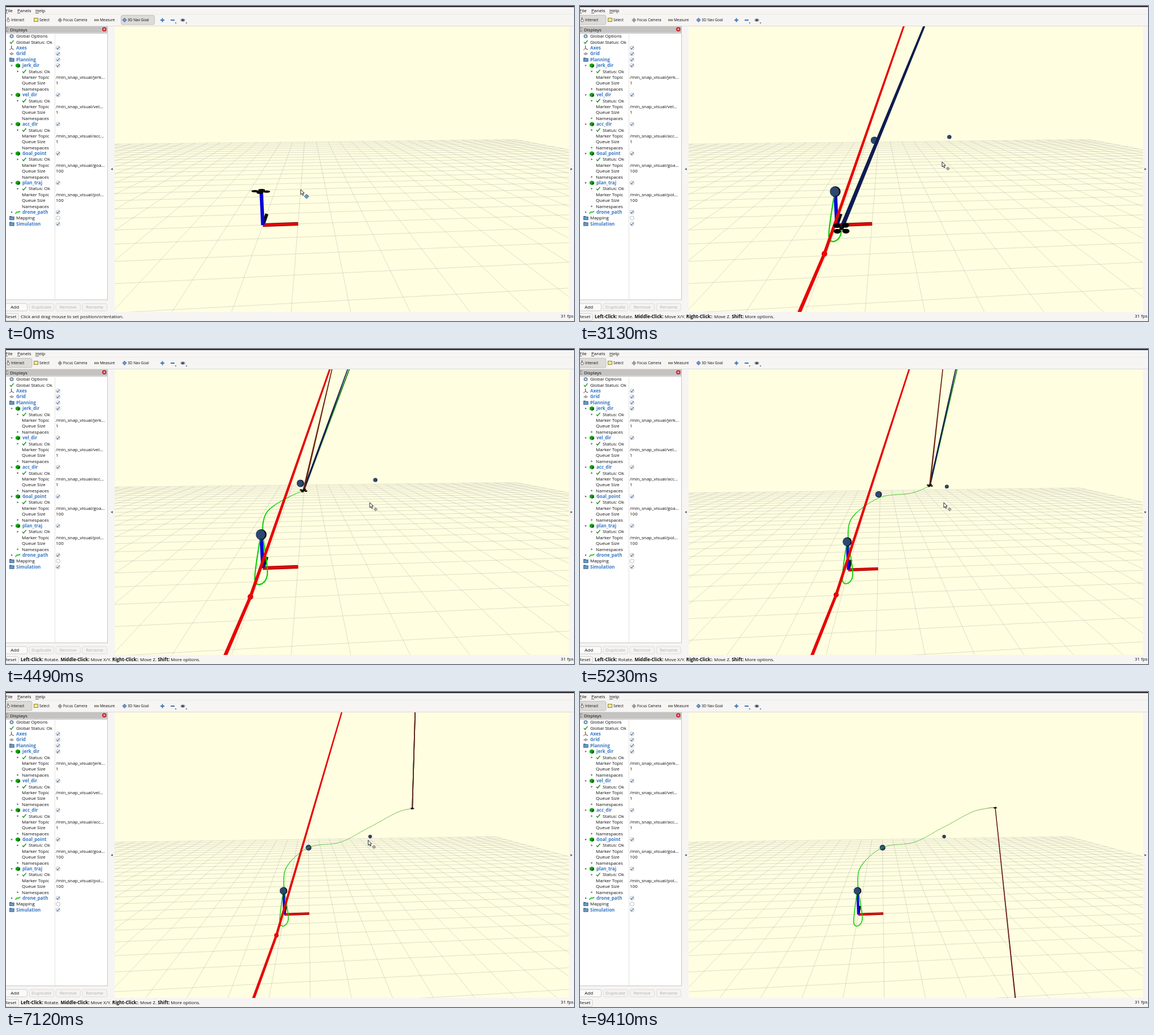
An HTML page with a canvas that plays this animation: 1004 px wide and 558 px high, repeating every 9510 ms.

```html
<!DOCTYPE html>
<html lang="en">
<head>
<meta charset="utf-8">
<title>Drone trajectory planning</title>
<style>
html, body { margin: 0; width: 100%; height: 100%; overflow: hidden; background: #f6f5f4; }
canvas { display: block; }
</style>
</head>
<body>
<canvas id="stage" width="1004" height="558"></canvas>
<script>
const c = document.getElementById('stage').getContext('2d');
const LOOP = 9510, FONT = '"Open Sans", "Noto Sans", sans-serif';
const VIEW = { x: 192, y: 36, w: 803, h: 506, cx: 593.5, cy: 289, f: 612 };
const BLUE = '#3a78c2', INK = '#0c0c0c', RED = '#e60606';
const EVENT = { goal2: 500, tool: 1060, goal3: 1410, plan: 1600, move: 2290, flip: 2700,
                jerk: 3350, pull: 4950, turn: 7300, planEnd: 7500, leave: 8880 };

// ---------- helpers ----------
const clamp = v => Math.max(0, Math.min(1, v));
const ease = v => { v = clamp(v); return v * v * (3 - 2 * v); };
const mix = (a, b, k) => a + (b - a) * k;

function rect(x, y, w, h, fill, line) {
  if (fill) { c.fillStyle = fill; c.fillRect(x, y, w, h); }
  if (line) { c.strokeStyle = line; c.lineWidth = 1; c.strokeRect(x + .5, y + .5, w - 1, h - 1); }
}
function box(x, y, w, h, fill, line) {
  c.beginPath();
  c.roundRect(x, y, w, h, 2.5);
  c.fillStyle = fill; c.fill();
  c.strokeStyle = line; c.lineWidth = .8; c.stroke();
}
function shape(pts, fill) {
  c.beginPath();
  pts.forEach(([x, y]) => c.lineTo(x, y));
  c.closePath();
  c.fillStyle = fill; c.fill();
}
function poly(pts, color, width) {
  c.beginPath();
  pts.forEach(([x, y]) => c.lineTo(x, y));
  c.strokeStyle = color; c.lineWidth = width; c.stroke();
}
function disc(x, y, rx, ry, fill) {
  c.beginPath();
  c.ellipse(x, y, rx, ry, 0, 0, 7);
  c.fillStyle = fill; c.fill();
}
function text(s, x, y, { color = INK, size = 8, bold = false } = {}) {
  c.font = `${bold ? 'bold ' : ''}${size}px ${FONT}`;
  c.fillStyle = color;
  c.fillText(s, x, y);
  return x + c.measureText(s).width;
}
function taper([x0, y0], w0, [x1, y1], w1, fill) {
  const len = Math.hypot(x1 - x0, y1 - y0) || 1;
  const nx = (y0 - y1) / len / 2, ny = (x1 - x0) / len / 2;
  shape([[x0 + nx * w0, y0 + ny * w0], [x1 + nx * w1, y1 + ny * w1],
         [x1 - nx * w1, y1 - ny * w1], [x0 - nx * w0, y0 - ny * w0]], fill);
}

// ---------- camera ----------
const PITCH = 11.3 * Math.PI / 180, YAW = 5.5 * Math.PI / 180;
const sp = Math.sin(PITCH), cp = Math.cos(PITCH), sw = Math.sin(YAW), cw = Math.cos(YAW);
const SHIFT = [-.056, .791, 4.05];
let pull = 0;

const toEye = ([x, y, z]) => [
  -2.257 + x * cw - y * sw,
  1.602 - (x * sw + y * cw) * sp - z * cp,
  9.9 + (x * sw + y * cw) * cp - z * sp];
const moved = p => p.map((v, i) => v + SHIFT[i] * pull);
const flat = ([x, y, z]) => [VIEW.cx + x / z * VIEW.f, VIEW.cy + y / z * VIEW.f];
const project = p => flat(moved(toEye(p)));

function groundLine(a, b) {
  let p = moved(toEye(a)), q = moved(toEye(b));
  if (p[2] > q[2]) [p, q] = [q, p];
  const near = .4;
  if (q[2] < near) return;
  if (p[2] < near) {
    const k = (near - p[2]) / (q[2] - p[2]);
    p = p.map((v, i) => mix(v, q[i], k));
  }
  c.moveTo(...flat(p));
  c.lineTo(...flat(q));
}
function grid() {
  c.beginPath();
  for (let i = -20; i <= 20; i++) {
    groundLine([i, -20, 0], [i, 20, 0]);
    groundLine([-20, i, 0], [20, i, 0]);
  }
  c.strokeStyle = 'rgba(150,150,155,.48)';
  c.lineWidth = .65;
  c.stroke();
}
function axes() {
  const o = project([0, 0, 0]), w = 62 / moved(toEye([0, 0, 0]))[2];
  const x = project([1, 0, 0]), y = project([0, 1, 0]), z = project([0, 0, 1]);
  taper(o, w, y, w * .92, '#08120a');
  taper(o, w, x, w, '#7c0404');
  taper(o, w * .72, x, w * .72, '#e60606');
  taper(o, w, z, w, '#0606d8');
}

// ---------- flight ----------
// time, screen x, screen y in the pulled-back view, depth in the close view
const KEYS = [
  [2250, 490, 352, 9.7], [2700, 484, 410, 9.3], [3080, 499, 403, 9.4], [3550, 491, 338, 10.3],
  [4000, 499, 305, 14.5], [4490, 535, 277, 22], [4950, 590, 269, 24], [5500, 640, 238, 27],
  [6200, 690, 214, 33], [7200, 720, 206, 39], [9410, 734, 205, 42]];

function spline(t) {
  const last = KEYS.length - 1;
  let i = 0;
  while (i < last - 1 && t >= KEYS[i + 1][0]) i++;
  const [a, b, d, e] = [i - 1, i, i + 1, i + 2].map(n => KEYS[Math.max(0, Math.min(last, n))]);
  const k = clamp((t - b[0]) / (d[0] - b[0]));
  return [1, 2, 3].map(n => b[n] + k / 2 * (d[n] - a[n] +
    k * (2 * a[n] - 5 * b[n] + 4 * d[n] - e[n] + k * (3 * (b[n] - d[n]) + e[n] - a[n]))));
}
function flight(t) {
  const [x, y, z] = spline(t), far = z + SHIFT[2], s = t - 5200;
  const sway = 4 * Math.sin(s / 1000 * Math.PI) * Math.exp(-((s / 900) ** 2));
  return [(x - VIEW.cx) / VIEW.f * far - SHIFT[0], (y + sway - VIEW.cy) / VIEW.f * far - SHIFT[1], z];
}
function trail(t) {
  const start = KEYS[0][0], step = 60;
  for (let s = start; s < t; s += step) {
    const a = moved(flight(s)), b = moved(flight(Math.min(t, s + step)));
    const far = clamp((b[2] - 16) / 28);
    poly([flat(a), flat(b)],
      `rgb(${mix(18, 130, far)},${mix(208, 165, far)},${mix(10, 85, far)})`,
      Math.max(.75, 21 / b[2]));
  }
}
function goal(p) {
  const e = moved(p), [x, y] = flat(e), r = 90 / e[2];
  disc(x + r * .1, y, r * 1.02, r * 1.02, '#10161f');
  disc(x - r * .05, y, r * .88, r * .9, '#2c4770');
}
function drone(t) {
  const e = moved(flight(t)), [x, y] = flat(e), s = 9.7 / e[2];
  const tilt = ease((t - 2250) / 300) * (1 - ease((t - 3500) / 400) * .5);
  for (let i = 0; i < 4; i++) {
    const a = i * Math.PI / 2 + mix(.15, .75, tilt);
    const px = x + Math.cos(a) * 10.5 * s, py = y + Math.sin(a) * mix(2.5, 7, tilt) * s;
    poly([[x, y], [px, py]], '#000', Math.max(.8, 2 * s));
    disc(px, py, 6.2 * s, mix(2, 4, tilt) * s, '#000');
  }
  disc(x, y, Math.max(1.3, 3.5 * s), Math.max(1.3, 2.8 * s), '#1a0805');
}

// Direction vectors start at the drone and leave the view at its top or bottom edge
function vectors(t) {
  const e = moved(flight(t)), from = flat(e), w = Math.max(1.5, 70 / e[2]);
  const k = clamp((t - 3130) / 3070) ** .9;
  const up = (spread, color) =>
    taper(from, w, [from[0] + mix(147, 5, k) + spread * 4 * k * (1 - k), 34], Math.max(1.6, w * .45), color);
  const down = (lean, color) => taper(from, w, [from[0] + lean, 544], w * 1.35, color);
  if (t < EVENT.plan) return;
  if (t >= EVENT.turn) return down(26 + (t - 8070) * .0072, '#641818');
  up(3, '#127a12');
  if (t < EVENT.flip) down(-104, '#121a54');
  else up(0, '#121a54');
  if (t > EVENT.jerk) up(-28, '#6b2410');
}
function plan(t) {
  if (t < EVENT.plan || t > EVENT.planEnd) return;
  if (t < EVENT.move + 90) return taper([563.5, 34], 3, [377, 544], 6.5, RED);
  const at = (x0, y0, x1, y1) => [mix(x0, x1, pull), mix(y0, y1, pull)];
  const top = at(573, 34, 594, 34), knee = at(432, 439, 478, 431), end = at(387, 544, 437, 544);
  const w = mix(1, .78, pull);
  taper(top, 3 * w, knee, 5.6 * w, RED);
  taper(knee, 5.6 * w, end, 6.4 * w, RED);
  disc(...knee, 5 * w, 5 * w, RED);
}
function scene(t) {
  c.save();
  c.beginPath();
  c.rect(VIEW.x, VIEW.y, VIEW.w, VIEW.h);
  c.clip();
  rect(VIEW.x, VIEW.y, VIEW.w, VIEW.h, '#fffee0');
  c.lineJoin = c.lineCap = 'round';
  grid();
  if (t > EVENT.goal2) goal([-1.71, -1.185, 14.2]);
  if (t > EVENT.goal3) goal([2.48, -2.394, 25.7]);
  axes();
  trail(t);
  plan(t);
  vectors(t);
  if (t > EVENT.goal3) goal([-2.27, .63, 9.7]);
  drone(t);
  c.restore();
}

// ---------- interface ----------
function diamond(x, y, r) {
  const pts = [[x, y - r], [x + r, y], [x, y + r], [x - r, y]];
  shape(pts, '#6f97cc');
  poly([...pts, pts[0]], '#34527f', .8);
}
function tick(x, y, color, s = 1, w = 1.4) {
  poly([[x - 3 * s, y], [x - s, y + 2.5 * s], [x + 3.5 * s, y - 3 * s]], color, w);
}
function arrow(x, y, angle, s = 1.6) {
  const turn = n => angle + n * Math.PI * 2 / 3;
  shape([0, 1, 2].map(n => [x + Math.cos(turn(n)) * s * 1.2, y + Math.sin(turn(n)) * s * 1.2]), '#555');
}
const RIGHT = 0, DOWN = Math.PI / 2, LEFT = Math.PI;

function moveIcon(x, y, r, color) {
  poly([[x - r, y], [x + r, y]], color, 1);
  poly([[x, y - r], [x, y + r]], color, 1);
  c.lineWidth = .8;
  c.strokeRect(x - r * .5, y - r * .5, r, r);
}
function toolbar(nav) {
  rect(0, 0, 1004, 36, '#f6f5f4');
  rect(0, 0, 1004, 2, '#2e2a31');
  rect(0, 14, 1004, 1, '#eceae8');
  rect(0, 35, 1004, 1, '#dddbd8');
  [['File', -1, 4], ['Panels', 20, 5], ['Help', 52, 6]].forEach(([s, x, w]) => {
    text(s, x, 11);
    rect(x, 12, w, .7, INK);
  });
  if (nav) box(203.5, 16.5, 59, 16.5, '#dddbd8', '#b9b6b1');
  else box(-4, 16.5, 50, 16.5, '#dddbd8', '#b9b6b1');
  const label = (s, x) => text(s, x, 27.2, { size: 6.5 });
  box(2, 23, 4, 5, '#fff', '#444'); poly([[3.5, 24], [3.5, 20]], '#444', 1);
  label('Interact', 9);
  rect(49, 21, 8, 7, '#f3e98a', '#8b8440'); label('Select', 59);
  moveIcon(95.5, 25, 4, '#777'); label('Focus Camera', 101);
  rect(156, 23.5, 8, 3, '#d8d2b5', '#77735c'); label('Measure', 166);
  diamond(209.5, 24.8, 3.6); label('3D Nav Goal', 215);
  rect(273, 24, 7, 2, '#3b76b5'); rect(275.5, 21.5, 2, 7, '#3b76b5');
  rect(291, 24, 7, 2, '#3b76b5');
  disc(312.5, 25, 4, 2.7, '#8795a5'); disc(312.5, 25, 1.5, 1.5, '#223');
  arrow(300, 30, DOWN, 1.3); arrow(319, 30, DOWN, 1.3);
}

const TOPICS = [['jerk_dir', 'jerk', 1], ['vel_dir', 'vel', 1], ['acc_dir', 'acc', 1],
                ['Goal_point', 'goa', 100], ['plan_traj', 'pol', 100]];
const rowY = i => 53.5 + i * 10.39;

function check(y, on = true) {
  box(88.7, y - 3.3, 6.6, 6.6, '#fff', '#aaa');
  if (on) tick(92, y, '#2c62a8', .75, 1.1);
}
function folder(y) {
  rect(6, y - 3.5, 4, 2, '#41698f');
  rect(6, y - 2.5, 8.5, 6, '#6b9bc8', '#41698f');
}
function cube(x, y) {
  shape([[x, y - 4], [x + 4, y - 2], [x + 4, y + 2], [x, y + 4], [x - 4, y + 2], [x - 4, y - 2]], '#12a412');
  shape([[x, y], [x + 4, y - 2], [x + 4, y + 2], [x, y + 4]], '#0a700a');
}
function sidebar(planned) {
  rect(0, 36, 192, 508, '#f6f5f4');
  rect(0, 36, 180, 11.5, '#c4c3c2');
  rect(0, 38, 3.5, 7, '#eee', '#777');
  text('Displays', 7, 45);
  box(170.5, 38, 6.5, 6.5, '#e23030', '#a31616');
  poly([[172.5, 40], [175, 42.5]], '#fff', 1); poly([[175, 40], [172.5, 42.5]], '#fff', 1);
  rect(-1, 48, 181, 473, '#fff', '#c9c7c4');
  rect(86, 48, 1, 472, '#e3e2e0');

  const item = (i, s, x, strong) => text(s, x, rowY(i) + 2.8, strong ? { color: BLUE, bold: true } : {});
  const group = (i, s, x = 18) => { item(i, s, x, true); check(rowY(i)); };
  disc(10, rowY(0), 3.6, 3.6, '#7893ad'); disc(10, rowY(0), 1.3, 1.3, '#fff');
  item(0, 'Global Options', 18);
  tick(10, rowY(1), '#1a8a1a'); item(1, 'Global Status: Ok', 18);
  const ay = rowY(2), gy = rowY(3);
  poly([[9.5, ay - 4], [9.5, ay + 1], [14, ay + 3]], '#333', 1); poly([[9.5, ay + 1], [6, ay + 3.5]], '#b33', 1);
  group(2, 'Axes');
  shape([[6, gy], [10, gy - 2.6], [14, gy], [10, gy + 2.6]], '#8b8b8b');
  poly([[8, gy - 1.3], [12, gy + 1.3]], '#ddd', .6); poly([[8, gy + 1.3], [12, gy - 1.3]], '#ddd', .6);
  group(3, 'Grid');
  folder(rowY(4)); group(4, 'Planning');

  TOPICS.forEach(([name, topic, size], n) => {
    const i = 5 + n * 5;
    arrow(10, rowY(i), DOWN); cube(21, rowY(i)); group(i, name, 29);
    arrow(20.5, rowY(i + 1), RIGHT); tick(32, rowY(i + 1), '#1a8a1a'); item(i + 1, 'Status: Ok', 40);
    item(i + 2, 'Marker Topic', 28); item(i + 2, `/min_snap_visual/${topic}...`, 88);
    item(i + 3, 'Queue Size', 28); item(i + 3, size, 88);
    item(i + 4, 'Namespaces', 28);
    if (planned) arrow(20.5, rowY(i + 4), RIGHT);
  });
  const py = rowY(30);
  arrow(10, py, RIGHT);
  c.beginPath(); c.moveTo(17, py + 3); c.bezierCurveTo(19, py - 4, 22, py + 3, 25, py - 2);
  c.strokeStyle = '#1fc41f'; c.lineWidth = 1.8; c.stroke();
  group(30, 'drone_path', 29);
  folder(rowY(31)); item(31, 'Mapping', 18); check(rowY(31), false);
  folder(rowY(32)); group(32, 'Simulation');

  ['Add', 'Duplicate', 'Remove', 'Rename'].forEach((s, n) => {
    const x = -6 + n * 47;
    box(x, 527, 43.5, 13, n ? '#f4f3f2' : '#fbfafa', n ? '#d8d6d3' : '#c4c1bd');
    c.textAlign = 'center';
    text(s, x + 21.7, 536.4, { color: n ? '#b3b1ae' : INK });
    c.textAlign = 'left';
  });
  arrow(187.5, 289, LEFT, 2);
}
function statusBar(mode) {
  rect(0, 542, 1004, 16, '#f6f5f4');
  box(-6, 544.8, 28, 12, '#fbfafa', '#c4c1bd');
  text('Reset', -2, 553.4);
  if (mode === 'goal') text('Click and drag mouse to set position/orientation.', 26, 553.4);
  if (mode === 'view') {
    let x = 26;
    ['Left-Click:', ' Rotate. ', 'Middle-Click:', ' Move X/Y. ', 'Right-Click:', ': Move Z. ', 'Shift:', ' More options.']
      .forEach((s, i) => { x = text(s, x, 553.4, { bold: i % 2 === 0 }); });
  }
  text('31 fps', 980.5, 551.5);
}

// start, duration, x, y
const GLIDES = [[600, 400, 652, 310], [2290, 500, 640, 276], [3200, 400, 643, 272],
                [6300, 1700, 637, 252], [8300, 600, 826, 6]];
function pointer(t, withGoal) {
  if (t > EVENT.leave) return;
  let x = 521, y = 325;
  for (const [start, span, gx, gy] of GLIDES) {
    const k = ease((t - start) / span);
    x = mix(x, gx, k);
    y = mix(y, gy, k);
  }
  const pts = [[0, 0], [0, 9], [2, 7.2], [3.5, 10.5], [5, 9.8], [3.6, 6.6], [6.2, 6.4]].map(([a, b]) => [x + a, y + b]);
  shape(pts, '#fff');
  poly([...pts, pts[0]], '#111', .9);
  if (withGoal) diamond(x + 10.3, y + 12.3, 4);
  else moveIcon(x + 10.3, y + 12, 3.6, '#8a8a86');
}

function draw(t) {
  pull = ease((t - EVENT.pull) / 600);
  const nav = t < EVENT.goal2 || (t >= EVENT.tool && t < EVENT.goal3);
  const viewTip = (t > 600 && t < EVENT.tool) || t > EVENT.move;
  toolbar(nav);
  sidebar(t >= EVENT.plan);
  rect(995, 36, 9, 506, '#f6f5f4');
  arrow(999, 289, RIGHT, 2);
  scene(t);
  statusBar(t > EVENT.leave ? '' : viewTip ? 'view' : 'goal');
  pointer(t, !viewTip);
}
function frame() {
  draw(performance.now() % LOOP);
  requestAnimationFrame(frame);
}
frame();
</script>
</body>
</html>
```
